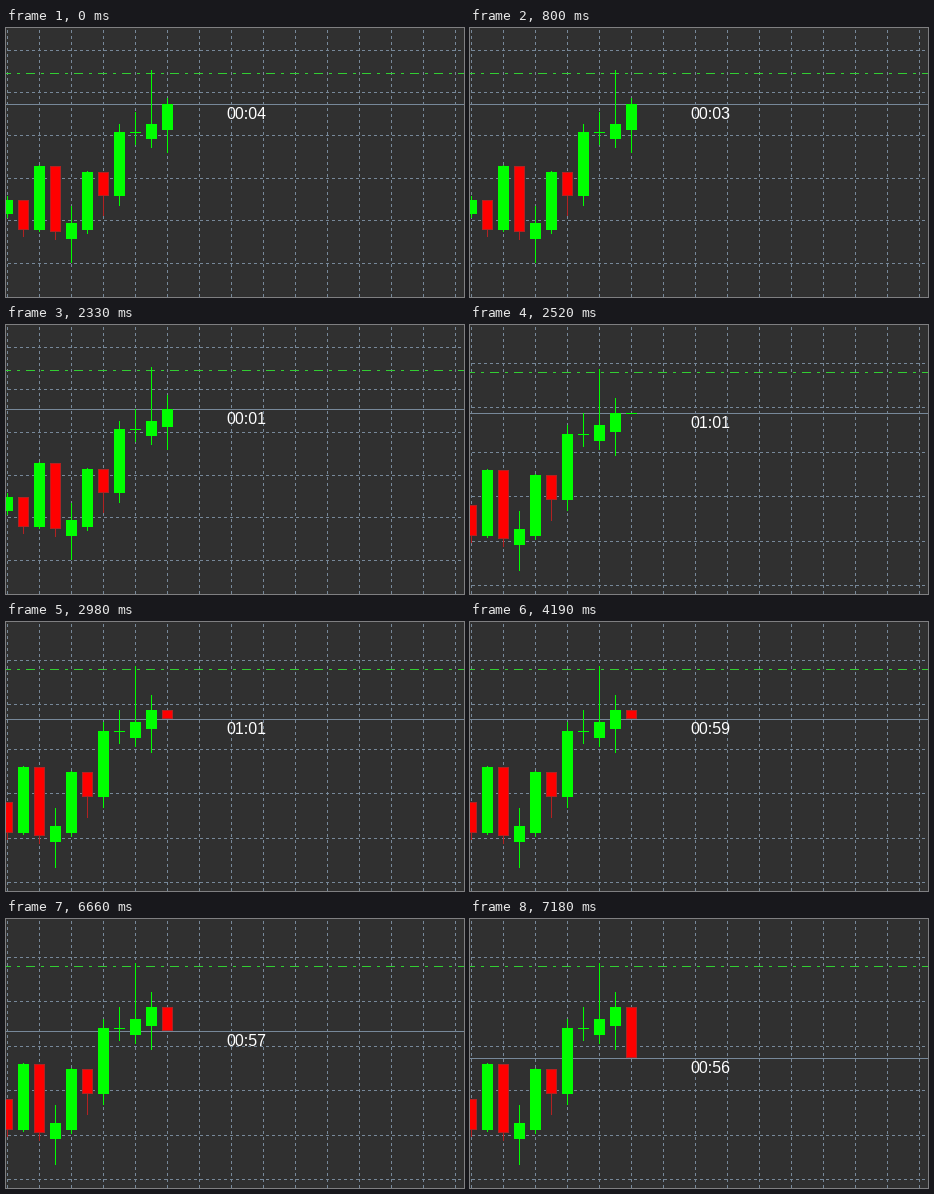
These frames come from a looping animation (458 by 269 pixels, 7280 ms). A matplotlib script:

```python
import numpy as np
import matplotlib.pyplot as plt
from matplotlib.animation import FuncAnimation

W, H, DPI = 458, 269, 64
LOOP, STEP = 7280, 10  # ms

BACK = (48, 48, 48)
SLATE = (119, 136, 153)
LIME = (0, 255, 0)
LIME_GREEN = (50, 205, 50)
RED = (255, 0, 0)
FIREBRICK = (178, 34, 34)

DOT = (3, 3)
DASH_DOT = (9, 6, 3, 6)
DASH_PHASE = 4
BAR_STEP, HALF_BODY = 16, 5
BAR_COUNT = 11

SWITCH = 2520       # a new bar opens and the chart scrolls by one
FIRST_SECOND, SECOND = 250, 985
LEVEL = 47

# close, upper wick, lower wick (rows at the scale after the switch)
FIRST_OPEN = 194
BARS = [
    (180, 4, 5), (211, 0, 7), (144.6, 1, 2), (213.5, 0, 8), (204, 18, 25),
    (150, 1, 4), (175, 0, 21), (109, 9, 11), (109, 21, 13), (100, 56, 9),
    (88, 15, 24), (88, 0, 0),
]

# time in ms: row of the price on screen
PRICES = {0: 76, 320: 73, 800: 76, 1440: 70, 1660: 76, 2330: 84,
          SWITCH: 88, 2740: 91, 2980: 97, 4430: 103, 6660: 112}
PRICES.update({6850 + 110 * i: 121 + 9 * i for i in range(3)})


def new_scale(y):
    return round(y)


def old_scale(y):
    return round(138.8 + (y - 145) / 1.045)


def bar_rows(k):
    """Open, close, high and low; two bars in five open with a gap."""
    close, upper, lower = BARS[k]
    gap = 7 if k % 5 in (0, 4) else 0
    start = BARS[k - 1][0] + gap if k else FIRST_OPEN
    return start, close, min(start, close) - upper, max(start, close) + lower


def dashes(length, pattern):
    cycle = np.repeat(np.arange(len(pattern)) % 2 == 0, pattern)
    return np.resize(np.roll(cycle, -DASH_PHASE), length)


def hline(img, y, color, pattern=(1,)):
    img[y, dashes(W, pattern)] = color


def vline(img, x, color, pattern=(1,)):
    img[dashes(H, pattern), x] = color


def candle(img, x, start, close, high, low):
    edge, fill = (FIREBRICK, RED) if close > start else (LIME, LIME)
    top, bottom = sorted((start, close))
    bottom = max(bottom, top + 1)
    left, right = x - HALF_BODY, x + HALF_BODY + 1
    img[high:low, x] = edge
    img[top:bottom, max(left, 0):right] = edge
    img[top + 1:bottom - 1, max(left + 1, 0):right - 1] = fill


def chart(scrolled, price):
    scale = new_scale if scrolled else old_scale
    grid_top, pitch = (38, 44.4) if scrolled else (21.6, 42.65)
    img = np.full((H, W, 3), BACK, dtype=np.uint8)
    for x in range(1, W, 2 * BAR_STEP):
        vline(img, x, SLATE, DOT)
    for i in range(6):
        hline(img, round(grid_top + i * pitch), SLATE, DOT)
    hline(img, scale(LEVEL), LIME_GREEN, DASH_DOT)
    hline(img, price, SLATE)
    for i in range(BAR_COUNT):
        start, close, high, low = map(scale, bar_rows(i + scrolled))
        if i == BAR_COUNT - 1:
            close, high, low = price, min(high, price), max(low, price)
        candle(img, 1 + i * BAR_STEP, start, close, high, low)
    return img


def price_at(t):
    return PRICES[max(start for start in PRICES if start <= t)]


def clock_at(t):
    passed = (t - FIRST_SECOND) // SECOND + 1
    left = 4 - passed + (60 if t >= SWITCH else 0)
    return f"{left // 60:02d}:{left % 60:02d}"


plt.rcParams["text.hinting"] = "native"
fig = plt.figure(figsize=(W / DPI, H / DPI), dpi=DPI)
ax = fig.add_axes([0, 0, 1, 1])
ax.axis("off")
picture = ax.imshow(chart(False, price_at(0)), interpolation="nearest",
                    aspect="auto")
clock = ax.text(219.5, 0, "", color="white", family="Liberation Sans",
                size=16 * 72 / DPI, ha="left", va="baseline")


def update(frame):
    t = frame * STEP
    price = price_at(t)
    picture.set_data(chart(t >= SWITCH, price))
    clock.set_text(clock_at(t))
    clock.set_y(price + 14.5)
    return picture, clock


anim = FuncAnimation(fig, update, frames=LOOP // STEP, interval=STEP,
                     repeat=True, repeat_delay=0)
plt.show()
```
